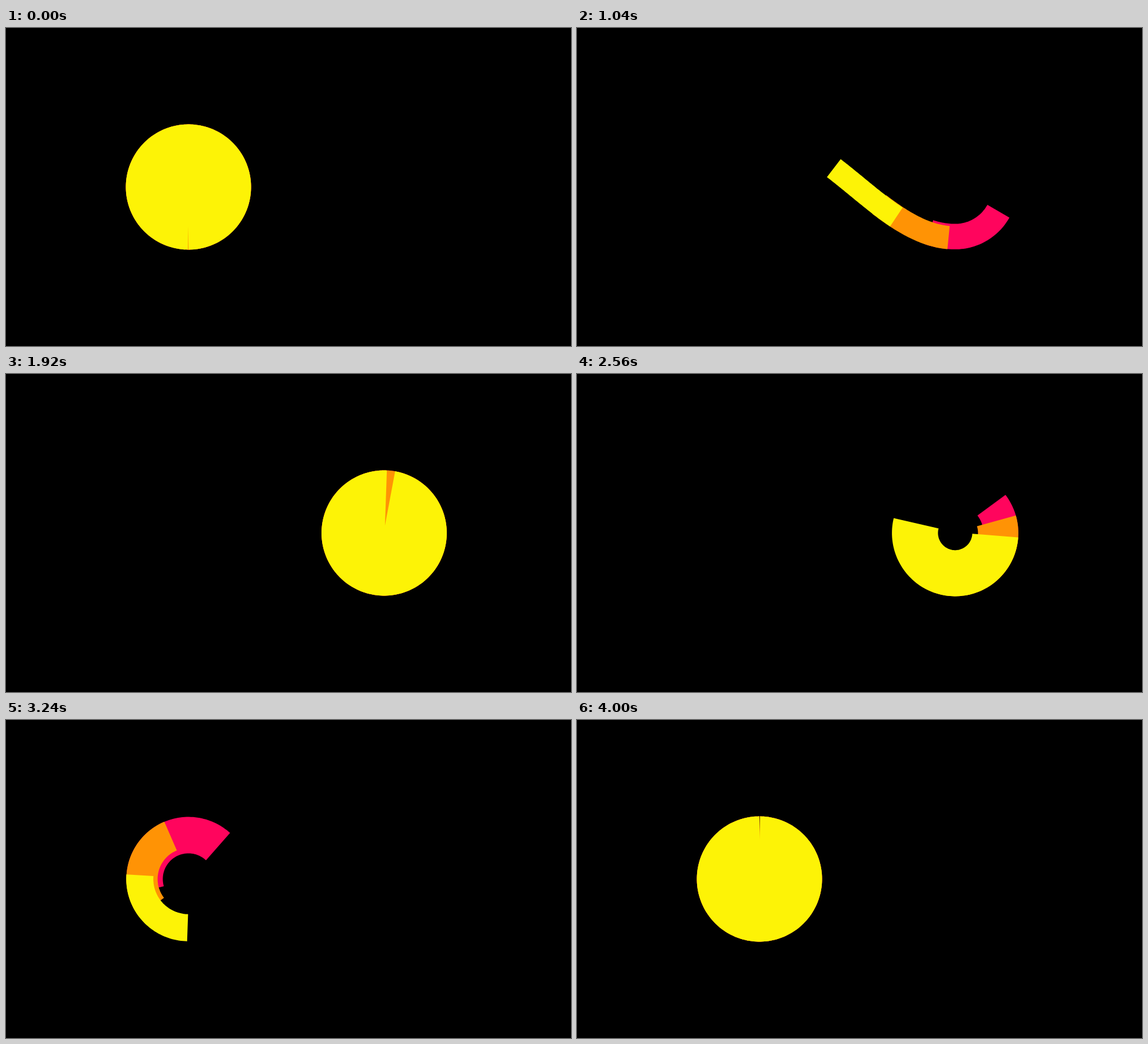
An HTML page with a canvas that plays this animation: 960x540 px, repeating every 4.04 s.

```html
<!DOCTYPE html>
<html>
<head>
<meta charset="utf-8">
<style>
  html, body { margin: 0; width: 100%; height: 100%; overflow: hidden; background: #000; }
  canvas { display: block; }
</style>
</head>
<body>
<canvas id="stage" width="960" height="540"></canvas>
<script>
const ctx = document.getElementById('stage').getContext('2d');
const LOOP = 4040, LEG = 2000, FRAME = 40;
const LEFT = 310, RIGHT = 642.5, MID_Y = 270;
const BRIDGE = 270;   // length of the S curve, in the same unit as degrees of arc
const HANDLE = 120;   // bezier handle of the S curve

// Bottom to top: each layer repeats the same motion a little later.
const layers = [
  { color: '#ff055d', delay: 0 },
  { color: '#ff9305', delay: 80 },
  { color: '#fdf306', delay: 160 }
];

// [ms, position]: below 0 is the departing circle, above BRIDGE the arriving one.
const headKeys = [[-120, -180], [400, -94], [480, -74], [560, -53], [610, -38], [680, 12],
  [840, 155], [1080, 364], [1160, 427], [1240, 492], [1320, 555], [1400, 615], [1760, 800], [1840, 810]];
const tailKeys = [[-120, -540], [-40, -530], [320, -345], [400, -284], [520, -190], [680, -59],
  [1000, 200], [1080, 271], [1149, 318], [1160, 323], [1240, 344.5], [1320, 362], [1400, 382],
  [1760, 447], [1840, 450]];

// Monotone cubic interpolation, at rest at both ends.
function interpolate(keys, t) {
  const last = keys.length - 1;
  if (t <= keys[0][0]) return keys[0][1];
  if (t >= keys[last][0]) return keys[last][1];
  const slope = i => (keys[i + 1][1] - keys[i][1]) / (keys[i + 1][0] - keys[i][0]);
  const tangent = i => {
    if (i === 0 || i === last) return 0;
    const a = slope(i - 1), b = slope(i);
    return 2 * a * b / (a + b);
  };
  const i = keys.findIndex(key => key[0] > t) - 1;
  const [t0, v0] = keys[i], [t1, v1] = keys[i + 1];
  const span = t1 - t0, u = (t - t0) / span, w = 1 - u;
  return v0 * w * w * (1 + 2 * u) + v1 * u * u * (3 - 2 * u)
    + span * u * w * (w * tangent(i) - u * tangent(i + 1));
}

function pointAt(s, r) {
  if (s <= 0) {
    const a = s * Math.PI / 180;
    return [LEFT + r * Math.sin(a), MID_Y - r * Math.cos(a)];
  }
  if (s >= BRIDGE) {
    const a = (s - BRIDGE + 180) * Math.PI / 180;
    return [RIGHT - r * Math.sin(a), MID_Y - r * Math.cos(a)];
  }
  const u = s / BRIDGE, w = 1 - u;
  const bezier = (a, b, c, d) => a * w ** 3 + 3 * b * w * w * u + 3 * c * w * u * u + d * u ** 3;
  return [
    bezier(LEFT, LEFT + HANDLE, RIGHT - HANDLE, RIGHT),
    bezier(MID_Y - r, MID_Y - r, MID_Y + r, MID_Y + r)
  ];
}

function drawLayer(color, t) {
  const phase = Math.min(1, Math.max(0, t / 1760)) * Math.PI;
  const inner = 68 * Math.sin(phase) ** 2;
  const outer = 106.4 + Math.sin(2 * phase);
  const radius = (outer + inner) / 2;
  const tail = interpolate(tailKeys, t);
  const head = interpolate(headKeys, t) + 0.4;
  const steps = Math.ceil((head - tail) / 2);
  ctx.beginPath();
  for (let i = 0; i <= steps; i++) {
    ctx.lineTo(...pointAt(tail + (head - tail) * i / steps, radius));
  }
  ctx.strokeStyle = color;
  ctx.lineWidth = outer - inner;
  ctx.stroke();
}

function draw(now) {
  const t = Math.floor(now % LOOP / FRAME) * FRAME;
  const returning = t >= LEG;
  ctx.setTransform(1, 0, 0, 1, 0, 0);
  ctx.fillStyle = '#000';
  ctx.fillRect(0, 0, 960, 540);
  if (returning) ctx.setTransform(-1, 0, 0, 1, LEFT + RIGHT, 0);
  for (const { color, delay } of layers) drawLayer(color, t - (returning ? LEG : 0) - delay);
}

const start = performance.now();
function tick() {
  draw(performance.now() - start);
  requestAnimationFrame(tick);
}
tick();
</script>
</body>
</html>
```
